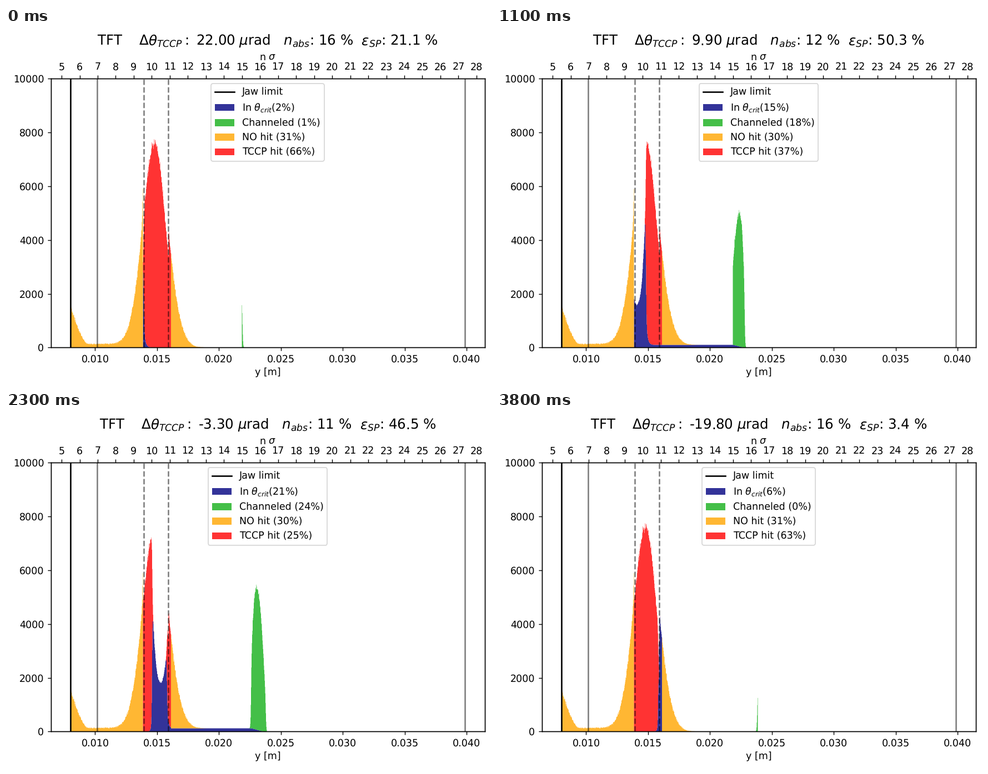
These frames come from a looping animation (873x641 px, 3900 ms). A matplotlib script:

```python
import numpy as np
import matplotlib.pyplot as plt
from matplotlib.animation import FuncAnimation
from matplotlib.lines import Line2D
from matplotlib.patches import Patch

W, H, DPI = 873, 641, 126
LEFT, RIGHT, TOP, BOTTOM = 80.6, 861.5, 91.3, 575.4
TITLE_BASE = 30.7
FRAMES, INTERVAL = 39, 100
COLORS = ["navy", "xkcd:green", "orange", "red"]
STEP = 0.5      # bin width in pixels
JUMP = 178      # shift of channeled particles in pixels

plt.rcParams["text.hinting"] = "none"


def metres(px):
    return 0.010 + (px - 160.5) / 22283


def sigmas(px):
    return (px + 62.3) / 32.47


def sigmoid(x):
    return 1 / (1 + np.exp(-np.clip(x, -50, 50)))


def decay(distance, length):
    """Exponential fall on the positive side of a border, zero before it."""
    return np.where(distance > 0, np.exp(-np.maximum(distance, 0) / length), 0)


def beam_profile(u):
    """Gaussian core with a jaw tail and a shadow beside the collimator."""
    width = np.where(u < 268, 22, np.where(u < 292.5, 19, 23.2))
    core = 7620 * np.exp(-0.5 * ((u - 268) / width) ** 2)
    tail = 1365 * np.clip(1 - (u - 117) / 30, 0, 1) ** 1.5
    floor = 135 * sigmoid((220 - u) / 8)
    rim = 1500 * decay(246.5 - u, 1)
    return core + tail + floor + rim


edges = np.arange(116.5, 480.1, STEP)
u = edges[:-1] + STEP / 2
beam = beam_profile(u)
rng = np.random.default_rng(4)
beam = np.clip(beam + np.sqrt(beam) * rng.standard_normal(u.size), 0, None)
collimator = (u > 246.5) & (u < 297.2)


def counts(angle):
    """Stacked counts: in critical angle, channeled, no hit, hit."""
    lo, hi = 257.6 - 1.65 * angle, 284.5 - 1.66 * angle
    s = np.clip((2 * u - lo - hi) / (hi - lo), -1, 1)
    inside = sigmoid((u - lo) / 0.5) * sigmoid((hi - u) / 0.5) * collimator

    efficiency = 0.74 - np.where(s < 0, 0.42, 0.48) * abs(s) ** 2.4
    taken = beam * efficiency * inside * (u < 291.3)
    channeled = np.roll(taken, int(JUMP / STEP))
    # Particles lost on the way spread evenly along the path
    lost = 0.00113 * STEP * (np.cumsum(taken) - np.cumsum(channeled))

    outside = beam * (1 - inside)
    foot = 0.15 * decay(u - hi, 2.5) + 0.05 * decay(lo - u, 2)
    foot *= outside * collimator

    critical = beam * inside - taken + foot + np.clip(lost, 0, None)
    rest = outside - foot
    return [critical, channeled, rest * ~collimator, rest * collimator]


def shares(i):
    """Percentages of the four groups; both windows ramp up, hold, ramp down."""
    left = FRAMES - 1 - i
    critical = min(2.4 + 1.14 * i, 21, 6 + 1.18 * left)
    channeled = max(min(0.6 + 1.55 * i, 24, 1.87 * left - 3.8), 0)
    no_hit = 30.85 - 0.02 * channeled
    return critical, channeled, no_hit, 100 - critical - channeled - no_hit


def absorbed(i):
    return 11 + 0.014 * (i - 18.6) ** 2


def efficiency_sp(i):
    return np.interp(i, [0, 7, 11, 20, 27, 32, 38],
                     [21.1, 47.2, 50.3, 48.7, 43.6, 33.8, 3.4])


LABELS = [r"In $\theta_{crit}$(%d%%)", "Channeled (%d%%)", "NO hit (%d%%)",
          "TCCP hit (%d%%)"]
TITLE = (r"TFT    $\Delta\theta_{TCCP}:$ %.2f $\mu$rad   "
         r"$n_{abs}$: %d %%  $\epsilon_{SP}$: %.1f %%")

fig = plt.figure(figsize=(W / DPI, H / DPI), dpi=DPI)
ax = fig.add_axes([LEFT / W, 1 - BOTTOM / H, (RIGHT - LEFT) / W,
                   (BOTTOM - TOP) / H])
ax.set_ylim(0, 10000)
ax.set_xlabel("y [m]")
top_ax = ax.twiny()
top_ax.set_xlim(sigmas(LEFT), sigmas(RIGHT))
top_ax.set_xticks(range(5, 29))
top_ax.set_xlabel(r"n $\sigma$", labelpad=2.5)

empty = np.zeros(u.size)
layers = [ax.stairs(empty, metres(edges), baseline=empty, fill=True, color=c,
                    alpha=0.8, lw=0, snap=False, zorder=1) for c in COLORS]
ax.axvline(metres(116.2), color="black", lw=1.5, zorder=2)
for px, style in [(163.9, "-"), (825.7, "-"), (247.6, "--"), (292.2, "--")]:
    ax.axvline(metres(px), color="black", alpha=0.5, ls=style, lw=1.5, zorder=2)
ax.set_xlim(metres(LEFT), metres(RIGHT))

handles = [Line2D([], [], color="black", lw=1.5)]
handles += [Patch(color=c, alpha=0.8, lw=0) for c in COLORS]
title_y = 1 + (TOP - TITLE_BASE) / (BOTTOM - TOP)


def draw(i):
    angle = 1.1 * (20 - i)
    base = empty
    for layer, values in zip(layers, counts(angle)):
        layer.set_data(values=base + values, baseline=base)
        base = base + values
    names = [text % round(v) for text, v in zip(LABELS, shares(i))]
    ax.legend(handles, ["Jaw limit"] + names, loc="upper center")
    ax.set_title(TITLE % (angle, round(absorbed(i)), efficiency_sp(i)),
                 fontsize=14, y=title_y, pad=0)
    return layers


anim = FuncAnimation(fig, draw, frames=FRAMES, interval=INTERVAL, repeat=True,
                     blit=False)
plt.show()
```
